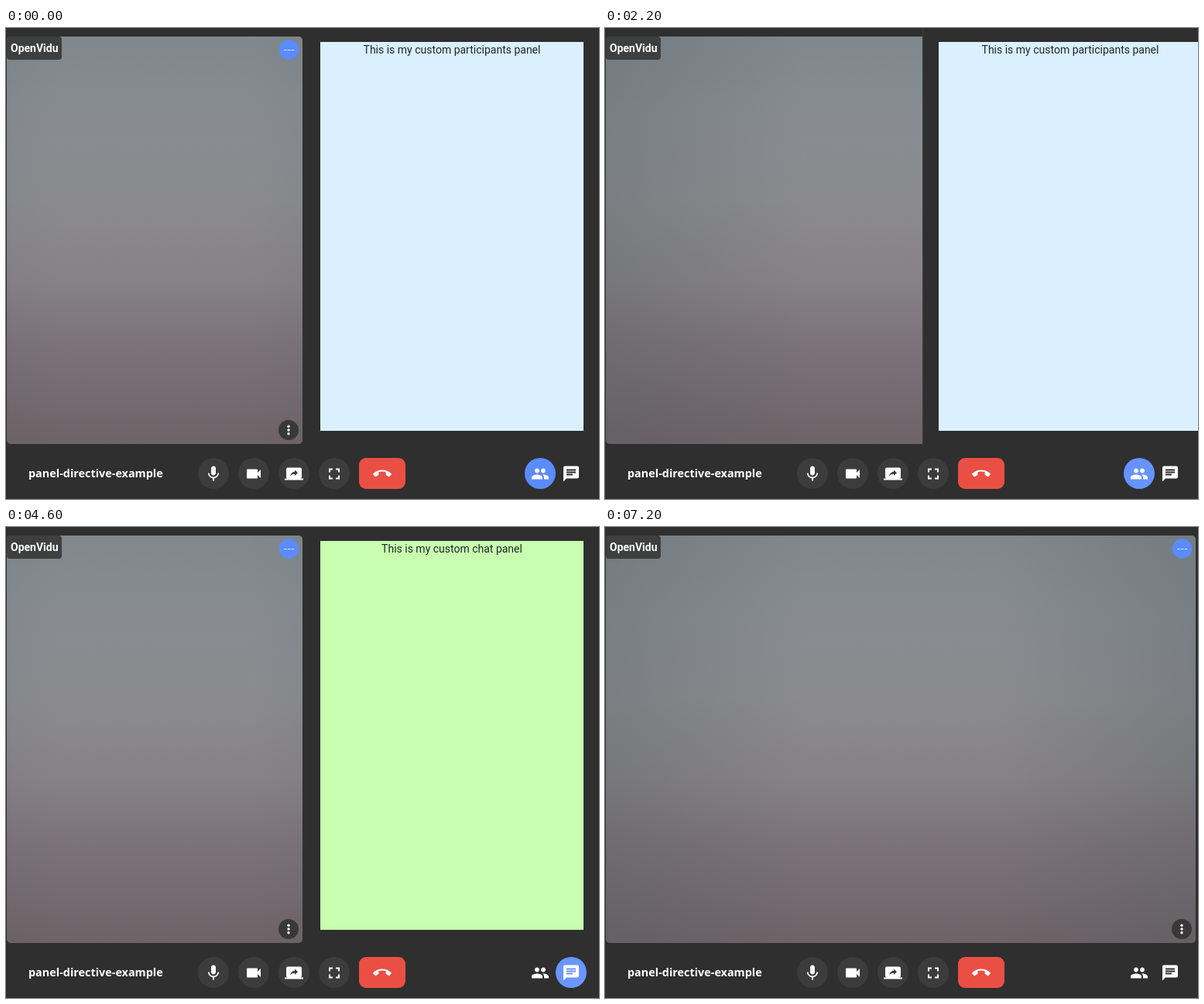
Animation of 766x608 px, one loop 7300 ms. Source, as an HTML page:

```html
<!DOCTYPE html>
<html lang="en">
<head>
<meta charset="utf-8">
<title>Custom panels</title>
<style>
  html, body { margin: 0; width: 100%; height: 100%; overflow: hidden; background: #2f2f2f; }
  svg { display: block; width: 766px; height: 608px; }
  text { font-family: Roboto, sans-serif; font-size: 14px; }
  .mid { text-anchor: middle; }
</style>
</head>
<body>
<svg viewBox="0 0 766 608">
  <defs>
    <linearGradient id="sky" x1="0" y1="0" x2="0" y2="1">
      <stop offset="0" stop-color="#80888d"/>
      <stop offset=".2" stop-color="#888c91"/>
      <stop offset=".4" stop-color="#8b8b8f"/>
      <stop offset=".6" stop-color="#868287"/>
      <stop offset=".75" stop-color="#7c7379"/>
      <stop offset="1" stop-color="#6e6367"/>
    </linearGradient>
    <linearGradient id="edge">
      <stop offset="0" stop-color="#465558" stop-opacity=".24"/>
      <stop offset=".34" stop-color="#465558" stop-opacity="0"/>
      <stop offset=".66" stop-color="#465558" stop-opacity="0"/>
      <stop offset="1" stop-color="#465558" stop-opacity=".24"/>
    </linearGradient>
    <clipPath id="frame"><rect id="frameBox" x="1" y="11" width="382" height="526" rx="5"/></clipPath>
  </defs>
  <rect width="766" height="608" fill="#2f2f2f"/>

  <g clip-path="url(#frame)">
    <g id="scene">
      <rect x="1" y="11" width="762" height="526" fill="url(#sky)"/>
      <rect x="1" y="11" width="762" height="526" fill="url(#edge)"/>
    </g>
  </g>
  <rect x="1" y="11" width="71" height="30" rx="4" fill="#3e3f3f"/>
  <text x="6" y="31" font-weight="700" fill="#fff">OpenVidu</text>
  <g id="corner">
    <circle cx="365.5" cy="28" r="12.7" fill="#5a8cff"/>
    <path d="M359 28.5h3.6m1.2 0h3.6m1.2 0h3.6" stroke="#dfe8ff" stroke-width="1.2"/>
    <circle cx="365" cy="519" r="13" fill="#393838"/>
    <g fill="#fff">
      <circle cx="365" cy="514.2" r="1.7"/>
      <circle cx="365" cy="519" r="1.7"/>
      <circle cx="365" cy="523.8" r="1.7"/>
    </g>
  </g>

  <g id="side">
    <rect x="386" width="380" height="540" fill="#2f2f2f"/>
    <path id="sideLine" d="M385.5 0V540" stroke="#3d3d3d"/>
    <rect id="panel" x="406" y="18" width="340" height="502"/>
    <text id="title" class="mid" x="576" y="33" fill="#222628"></text>
  </g>

  <text x="29" y="580" style="font:700 14.4px 'Noto Sans',sans-serif" fill="#fff">panel-directive-example</text>
  <g id="tools" fill="#fff">
    <rect x="456" y="555" width="60" height="40" rx="9" fill="#ea4f44"/>
  </g>

  <g id="tip">
    <rect id="tipBox" y="495" height="36" rx="4" fill="#616161" fill-opacity=".92"/>
    <text id="tipText" class="mid" y="518" fill="#e6e6e6"></text>
  </g>
</svg>
<script>
const LOOP = 7300, STEP = 100;
const $ = id => document.getElementById(id);
const set = (el, attrs) => { for (const k in attrs) el.setAttribute(k, attrs[k]); };

const icons = {
  mic: 'M12 14c1.66 0 2.99-1.34 2.99-3L15 5c0-1.66-1.34-3-3-3S9 3.34 9 5v6c0 1.66 1.34 3 3 3zm5.3-3c0 3-2.54 5.1-5.3 5.1S6.7 14 6.7 11H5c0 3.41 2.72 6.23 6 6.72V21h2v-3.28c3.28-.48 6-3.3 6-6.72h-1.7z',
  camera: 'M17 10.5V7c0-.55-.45-1-1-1H4c-.55 0-1 .45-1 1v10c0 .55.45 1 1 1h12c.55 0 1-.45 1-1v-3.5l4 4v-11l-4 4z',
  share: 'M20 18c1.1 0 2-.9 2-2V6c0-1.1-.9-2-2-2H4c-1.1 0-2 .9-2 2v10c0 1.1.9 2 2 2H0v2h24v-2h-4zm-7-3.53v-2.19c-2.78 0-4.61.85-6 2.72.56-2.67 2.11-5.33 6-5.87V7l4 3.73-4 3.74z',
  full: 'M7 14H5v5h5v-2H7v-3zm-2-4h2V7h3V5H5v5zm12 7h-3v2h5v-5h-2v3zM14 5v2h3v3h2V5h-5z',
  hangUp: 'M12 9c-1.6 0-3.15.25-4.6.72v3.1c0 .39-.23.74-.56.9-.98.49-1.87 1.12-2.66 1.85-.18.18-.43.28-.7.28-.28 0-.53-.11-.71-.29L.29 13.08c-.18-.17-.29-.42-.29-.7 0-.28.11-.53.29-.71C3.34 8.78 7.46 7 12 7s8.66 1.78 11.71 4.67c.18.18.29.43.29.71 0 .28-.11.53-.29.71l-2.48 2.48c-.18.18-.43.29-.71.29-.27 0-.52-.11-.7-.28-.79-.74-1.69-1.36-2.67-1.85-.33-.16-.56-.5-.56-.9v-3.1C15.15 9.25 13.6 9 12 9z',
  people: 'M16 11c1.66 0 3-1.34 3-3s-1.34-3-3-3-3 1.34-3 3 1.34 3 3 3zm-8 0c1.66 0 3-1.34 3-3S9.66 5 8 5 5 6.34 5 8s1.34 3 3 3zm0 2c-2.33 0-7 1.17-7 3.5V19h14v-2.5c0-2.33-4.67-3.5-7-3.5zm8 0c-.29 0-.62.02-.97.05 1.16.84 1.97 1.97 1.97 3.45V19h6v-2.5c0-2.33-4.67-3.5-7-3.5z',
  chat: 'M20 2H4c-1.1 0-2 .9-2 2v18l4-4h14c1.1 0 2-.9 2-2V4c0-1.1-.9-2-2-2zM6 9h12v2H6V9zm8 5H6v-2h8v2zm4-6H6V6h12v2z'
};

function add(tag, attrs) {
  const el = document.createElementNS('http://www.w3.org/2000/svg', tag);
  set(el, attrs);
  return $('tools').appendChild(el);
}

function button(name, x, fill) {
  const disc = add('circle', { cx: x, cy: 575, r: 20, fill });
  add('path', { d: icons[name], transform: `translate(${x - 12} 563.5)` });
  return disc;
}

['mic', 'camera', 'share', 'full'].forEach((name, i) => button(name, 268 + 52 * i, '#3c3c3c'));
button('hangUp', 486, 'none');
const peopleDisc = button('people', 690, 'none');
const chatDisc = button('chat', 730, 'none');

const within = (t, a, b) => t >= a && t < b;
const clamp = v => Math.min(1, Math.max(0, v));

// cubic-bezier(.25, .8, .25, 1)
function ease(x) {
  let lo = 0, hi = 1;
  for (let i = 0; i < 24; i++) {
    const s = (lo + hi) / 2;
    if (.75 * s * (1 - s) + s * s * s < x) lo = s; else hi = s;
  }
  const s = lo, q = 1 - s;
  return 2.4 * s * q * q + 3 * s * s * q + s * s * s;
}

function showTip(label, width, opacity) {
  set($('tipBox'), { x: 726 - width, width });
  $('tipText').textContent = label;
  set($('tipText'), { x: 726 - width / 2 });
  set($('tip'), { opacity });
}

function draw(t) {
  const wide = within(t, 1800, 2400) || t >= 5500;
  const people = t < 1600 || within(t, 2000, 2600);
  const chat = within(t, 2600, 5200);

  set($('frameBox'), { width: wide ? 762 : 382 });
  set($('scene'), { transform: `translate(${wide ? 0 : -190} 0)` });
  set($('corner'), { transform: `translate(${wide ? 380 : 0} 0)` });

  const slide = within(t, 2000, 2400) ? 380 * (1 - ease((t - 2000) / 400)) : 0;
  set($('side'), { transform: `translate(${Math.round(slide)} 0)`, visibility: people || chat ? 'visible' : 'hidden' });
  set($('sideLine'), { opacity: slide ? 1 : 0 });
  set($('panel'), { fill: chat ? '#c8ffb0' : '#daf0fe' });
  $('title').textContent = `This is my custom ${chat ? 'chat' : 'participants'} panel`;

  const hoverPeople = within(t, 1600, 2000), hoverChat = within(t, 5200, 6500);
  set(peopleDisc, { r: hoverPeople ? 18 : 20, fill: people ? (t < 1600 ? '#5a8cff' : '#6693ff') : hoverPeople ? '#3d3d3d' : 'none' });
  set(chatDisc, { r: hoverChat ? 18 : 20, fill: chat ? '#6a96ff' : hoverChat ? '#3d3d3d' : 'none' });

  if (t < 2000) showTip('Participants', 107, within(t, 1100, 1600) ? clamp((t - 1000) / 200) : 0);
  else showTip('Chat', 61, within(t, 2600, 2800) ? (t < 2700 ? .5 : .2) : 0);
}

function tick() {
  const t = performance.now() % LOOP;
  draw(Math.floor(t / STEP) * STEP);
  requestAnimationFrame(tick);
}
tick();
</script>
</body>
</html>
```
